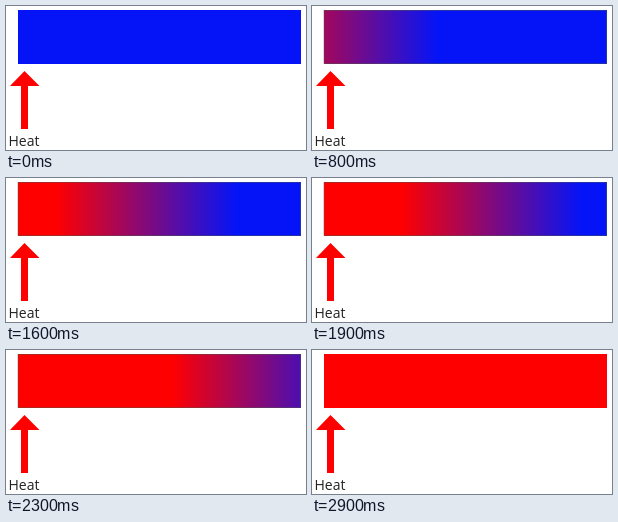
Animation, 300 px wide and 144 px high, one loop 3.4 s. Source, as an HTML page:

```html
<!DOCTYPE html>
<html>
<head>
<meta charset="utf-8">
<style>
  html, body { margin: 0; width: 100%; height: 100%; overflow: hidden; background: #fff; }
  svg { display: block; }
  text { font: 14px "Open Sans", "Noto Sans", sans-serif; fill: #222; }
</style>
</head>
<body>
<svg width="300" height="144" viewBox="0 0 300 144">
  <defs>
    <linearGradient id="heat" gradientUnits="userSpaceOnUse" y1="0" y2="0">
      <stop offset="0" stop-color="#ff0000"/>
      <stop offset="1" stop-color="#0514f6"/>
    </linearGradient>
  </defs>
  <rect x="12" y="4" width="283" height="54" fill="url(#heat)"/>
  <path id="edge" fill="none" stroke="#4a5a4a" stroke-opacity=".45"/>
  <path d="M18.5 65 L33.5 80 H22 V123 H15 V80 H4 Z" fill="#ff0000"/>
  <text x="2.5" y="140">Heat</text>
</svg>
<script>
  const LOOP = 3400, STEP = 100, SPREAD = 180;
  // [time, x where the bar is still fully blue]
  const front = [[0, 12], [800, 125], [1200, 178], [1600, 230], [2100, 295], [2500, 397], [2900, 475]];
  const gradient = document.getElementById('heat');
  const edge = document.getElementById('edge');

  function frontAt(t) {
    const i = front.findIndex(([time]) => time > t);
    if (i < 0) return front[front.length - 1][1];
    const [t0, x0] = front[i - 1], [t1, x1] = front[i];
    return x0 + (x1 - x0) * (t - t0) / (t1 - t0);
  }

  function draw() {
    const t = Math.floor(performance.now() % LOOP / STEP) * STEP;
    const x = frontAt(t);
    gradient.setAttribute('x1', x - SPREAD);
    gradient.setAttribute('x2', x);

    const left = t < 2500 ? 12 : Math.max(225, x - SPREAD);
    const visible = t > 0 && t < 2900;
    edge.setAttribute('d', visible ? `M${left} 4.5 H294.5 V57.5 H${left}${left === 12 ? ' V4' : ''}` : '');
    requestAnimationFrame(draw);
  }
  draw();
</script>
</body>
</html>
```
